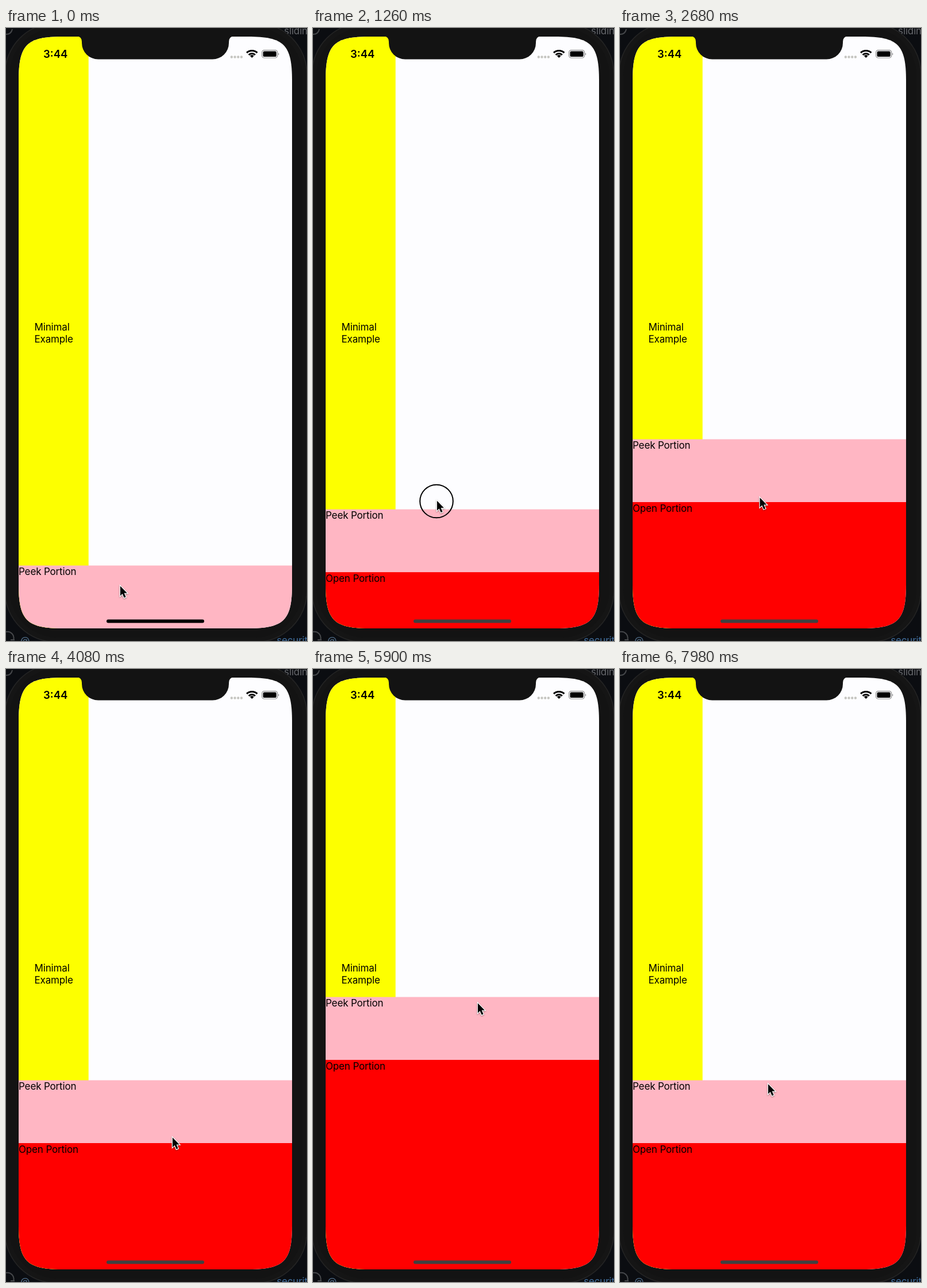
These frames come from a looping animation (524 by 1068 pixels, 8 s). An HTML page:

```html
<!DOCTYPE html>
<html lang="en">
<head>
<meta charset="utf-8">
<title>Bottom sheet</title>
<style>
  html, body { margin: 0; width: 100%; height: 100%; overflow: hidden; background: #0b0d11; }
  svg { display: block; width: 524px; height: 1068px; }
  text { font-family: Inter, Roboto, sans-serif; font-size: 17px; letter-spacing: -0.15px; }
</style>
</head>
<body>
<svg viewBox="0 0 524 1068">
  <defs>
    <clipPath id="screen"><path id="screenShape"/></clipPath>
  </defs>

  <!-- page behind the phone -->
  <rect width="524" height="1068" fill="#0b0d11"/>
  <g fill="none" stroke="#45474a" stroke-width="2">
    <path d="M0 11Q9 11 11 2"/>
    <path d="M0 1052A11 11 0 0 1 13 1066M8 1066H15"/>
  </g>
  <text x="25" y="1073" fill="#506c88">@</text>
  <g text-anchor="end">
    <text x="525" y="11" fill="#65676b">slidin</text>
    <text x="525" y="1073" fill="#406d9c">securit</text>
  </g>

  <!-- phone body -->
  <rect x="-2" y="-9" width="526" height="1079" rx="90" fill="#151515" stroke="#242424" stroke-width="1.5"/>
  <rect x="6" y="-1" width="510" height="1063" rx="84" fill="#131313"/>

  <g clip-path="url(#screen)">
    <rect x="22" y="15" width="476" height="1031" fill="#fdfdff"/>
    <rect x="22" y="15" width="121.7" height="1031" fill="#fdff00"/>
    <text x="49.5" y="526.5">Minimal</text>
    <text x="49.5" y="547.5">Example</text>
    <g id="sheet">
      <rect x="22" width="476" height="110" fill="#ffb6c3"/>
      <rect x="22" y="109.5" width="476" height="560" fill="#ff0000"/>
      <text x="22" y="16.3">Peek Portion</text>
      <text x="22" y="126.3">Open Portion</text>
    </g>
    <rect id="home" x="175" y="1030.5" width="170" height="6" rx="3"/>
  </g>

  <path fill="#131313" d="M123 14Q132 15 132 24V26A28.5 28.5 0 0 0 160.5 54.5H359.5A28.5 28.5 0 0 0 388 26V24Q388 15 397 14Z"/>

  <!-- status bar -->
  <text x="65" y="52.3" style="font-size:18.5px;font-weight:600;letter-spacing:0">3:44</text>
  <path d="M392.8 50.5H411" stroke="#c5c5c0" stroke-width="4.4" stroke-linecap="round" stroke-dasharray="0 5.7"/>
  <g transform="translate(0 -1)">
    <g fill="none" stroke="#000" stroke-width="3">
      <path d="M419 44.2A13.2 13.2 0 0 1 437.4 44.2"/>
      <path d="M422.6 47.9A8 8 0 0 1 433.8 47.9"/>
    </g>
    <path d="M428.2 53L424.8 49.5Q428.2 46.6 431.6 49.5Z"/>
  </g>
  <rect x="445.6" y="38.6" width="27" height="13.4" rx="4" fill="none" stroke="#8b8b8b" stroke-width="1.2"/>
  <rect x="447.5" y="40.5" width="23.2" height="9.6" rx="2.2"/>
  <path d="M474 43.2Q476.6 45.3 474 47.4Z" fill="#8b8b8b"/>

  <g id="pointer">
    <circle id="touch" cy="3" r="28.8" fill="none" stroke="#000" stroke-width="2"/>
    <path transform="scale(.93)" d="M1 2.5V20.6L5 16.9L8.2 24.3L11.4 22.9L8.2 15.7H13.8Z"
          stroke="#fff" stroke-width="2.6" paint-order="stroke" style="filter:drop-shadow(0 1px 1px #0006)"/>
  </g>
</svg>

<script>
const LOOP = 8000;
const OPEN_TOP = 716.5;
const [sheet, home, pointer, touch] = ['sheet', 'home', 'pointer', 'touch'].map(id => document.getElementById(id));

// Screen outline with continuous corners.
function squircle(l, t, r, b, size, pull) {
  const c = size * (1 - pull);
  return `M${l + size} ${t}H${r - size}C${r - c} ${t} ${r} ${t + c} ${r} ${t + size}` +
    `V${b - size}C${r} ${b - c} ${r - c} ${b} ${r - size} ${b}` +
    `H${l + size}C${l + c} ${b} ${l} ${b - c} ${l} ${b - size}` +
    `V${t + size}C${l} ${t + c} ${l + c} ${t} ${l + size} ${t}Z`;
}
document.getElementById('screenShape').setAttribute('d', squircle(22, 15, 498, 1046, 77, 0.82));

// Two upward drags; times are in steps, and the sheet springs to OPEN_TOP after each.
const drags = [
  { press: 6.7, release: 43.2, top: 936.5, peak: 824.5,
    from: { x: 198, y: 970 }, to: { x: 216, y: 817 }, next: { x: 289, y: 814 }, bow: 1 },
  { press: 88.7, release: 124, top: OPEN_TOP, peak: 515,
    from: { x: 289, y: 814 }, to: { x: 286, y: 580 }, next: { x: 257, y: 721 }, bow: 4 },
];

const mix = (a, b, u) => a + (b - a) * u;
const progress = (n, from, length) => Math.min(1, Math.max(0, (n - from) / length));
const easeOut = u => Math.sin(u * Math.PI / 2);
const smooth = u => u * u * (3 - 2 * u);

// Each 140 ms holds three steps: 20, 100 and 20 ms.
function stepAt(ms) {
  const rest = ms % 140;
  return 3 * Math.floor(ms / 140) + (rest < 20 ? 0 : rest < 120 ? 1 : 2);
}

function draw(ms) {
  const n = stepAt(ms);
  const drag = n < drags[1].press ? drags[0] : drags[1];
  const { press, release, from, to, next } = drag;

  // The sheet lags behind the pointer.
  const pulled = mix(drag.top, drag.peak, easeOut(progress(n, press, 30)));
  const top = mix(pulled, OPEN_TOP, smooth(progress(n, release, 8.6)));
  sheet.setAttribute('transform', `translate(0 ${top.toFixed(1)})`);

  const shade = Math.round(64 * progress(-top, -930, 20));
  home.setAttribute('fill', `rgb(${shade},${shade},${shade})`);

  const u = progress(n, press, 24), moved = easeOut(u);
  const glide = smooth(progress(n, release + 5, 24));
  const x = mix(mix(from.x, to.x, moved), next.x, glide) - drag.bow * Math.sin(u * Math.PI);
  const y = mix(mix(from.y, to.y, moved), next.y, glide);
  pointer.setAttribute('transform', `translate(${x.toFixed(1)} ${y.toFixed(1)})`);
  touch.setAttribute('visibility', n >= press && n < release ? 'visible' : 'hidden');
}

const start = performance.now();
function tick() {
  draw((performance.now() - start) % LOOP);
  requestAnimationFrame(tick);
}
draw(0);
requestAnimationFrame(tick);
</script>
</body>
</html>
```
